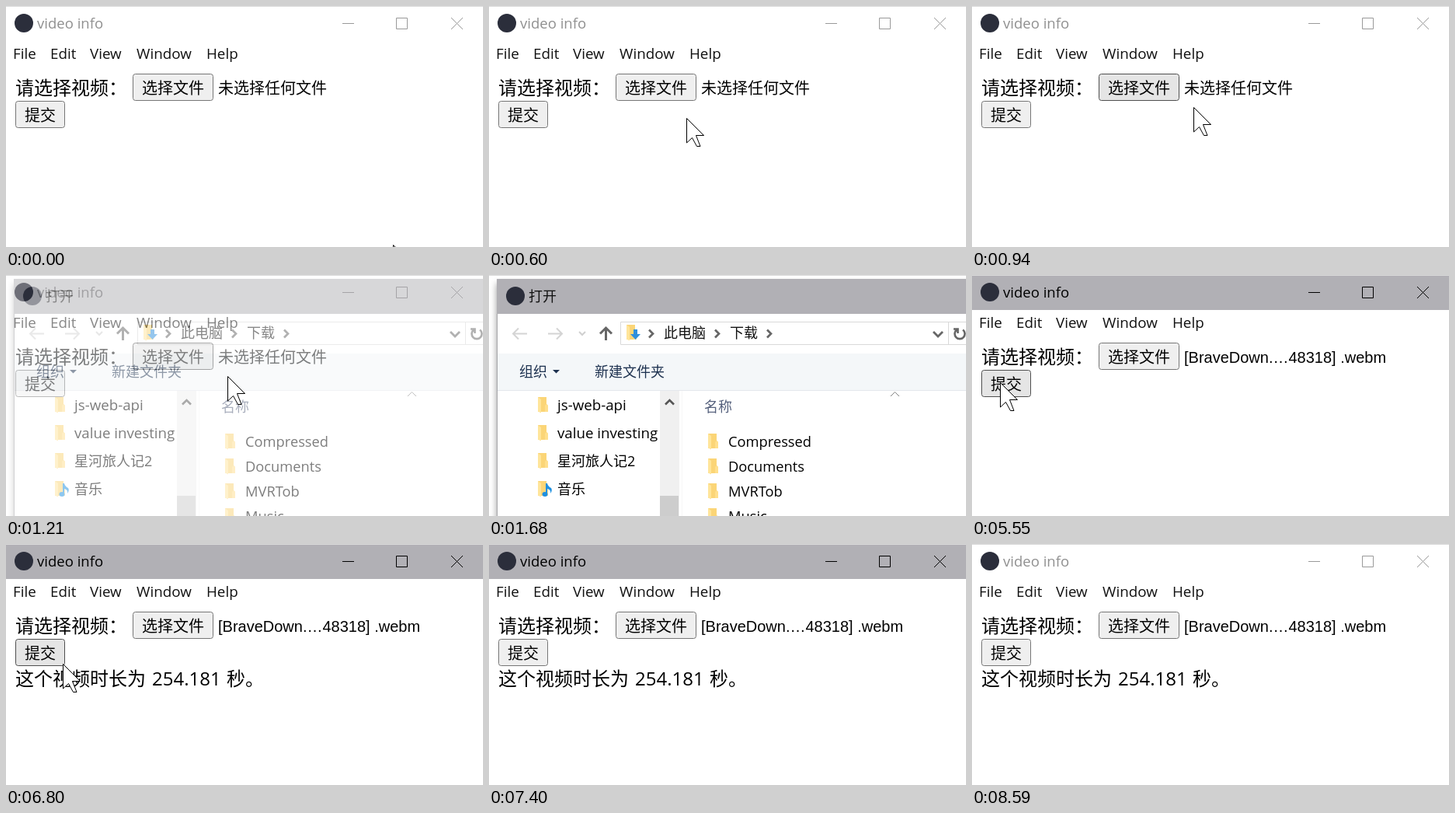
Recreate the animation shown at these times as an HTML page. Size 614x310 px, loop 8.72 s.

```html
<!DOCTYPE html>
<html lang="zh">
<head>
<meta charset="utf-8">
<title>video info</title>
<style>
  html, body { margin: 0; width: 100%; height: 100%; overflow: hidden; background: #fff; }
  svg { display: block; }
  text { font-family: "Open Sans", "Noto Sans CJK SC", "Noto Sans CJK", sans-serif; white-space: pre; }
  .cjk { font-family: "Noto Sans CJK SC", "Noto Sans CJK", sans-serif; }
  .arial { font-family: "Liberation Sans", Arial, sans-serif; }
  .shadow { filter: drop-shadow(0 6px 4px rgba(0, 0, 0, .4)); }
</style>
</head>
<body>
<svg id="stage" width="614" height="310" viewBox="0 0 614 310"></svg>
<script>
const LOOP = 8720;
const BAR = "#b1b0b5";
const stage = document.getElementById("stage");

function add(parent, tag, attrs, content) {
  const el = document.createElementNS("http://www.w3.org/2000/svg", tag);
  for (const key in attrs) el.setAttribute(key, attrs[key]);
  if (content) el.textContent = content;
  parent.appendChild(el);
  return el;
}
const group = (parent, attrs = {}) => add(parent, "g", attrs);
const rect = (parent, x, y, width, height, fill, more = {}) =>
  add(parent, "rect", { x, y, width, height, fill, ...more });
const line = (parent, d, stroke, width = 1) =>
  add(parent, "path", { d, stroke, "stroke-width": width, fill: "none" });
const shape = (parent, d, fill) => add(parent, "path", { d, fill });
const label = (parent, x, y, size, content, fill = "#000", cls = "") =>
  add(parent, "text", { x, y, "font-size": size, fill, class: cls }, content);
const show = (el, on) => el.setAttribute("visibility", on ? "visible" : "hidden");

// Main window
const win = group(stage);
rect(win, 0, 0, 614, 310, "#fff");
const bar = rect(win, 0, 1, 614, 44, "#fff");
rect(win, 0, 0, 614, 1, "#dadada");
add(win, "circle", { cx: 23, cy: 22, r: 12, fill: "#2b2e3b" });
const title = label(win, 40, 29, 18.5, "video info");
const controls = line(win, "M433 22.5H448M502.5 15.5H516.5V29.5H502.5ZM573 15L588 30M588 15L573 30");
[["File", 9], ["Edit", 57], ["View", 108], ["Window", 168], ["Help", 258]]
  .forEach(([name, x]) => label(win, x, 68, 18.8, name, "#111"));

function button(x, y, w, content) {
  const box = rect(win, x + .5, y + .5, w - 1, 34, "#efefef", { rx: 3 });
  label(win, x + 12, y + 26, 20, content, "#000", "cjk");
  return { box, x, y, w };
}
function paintButton(btn, dark) {
  btn.box.setAttribute("fill", dark ? "#e5e5e5" : "#efefef");
  btn.box.setAttribute("stroke", dark ? "#4f4f4f" : "#767676");
}
label(win, 12, 114, 24, "请选择视频：", "#000", "cjk");
const choose = button(163, 87, 104, "选择文件");
const submit = button(12, 122, 64, "提交");
const noFile = label(win, 273, 113, 20, "未选择任何文件", "#000", "cjk");
const fileName = label(win, 273, 113, 20, "[BraveDown.…48318] .webm", "#000", "arial");
const result = group(win);
label(result, 12, 182, 24, "这个视频时长为", "#000", "cjk");
label(result, 188, 182, 24, "254.181");
label(result, 284, 182, 24, "秒。", "#000", "cjk");

// File dialog
const dialog = group(stage);
rect(dialog, 10, 5, 640, 340, "#fff", { class: "shadow" });
rect(dialog, 10, 5, 604, 45, BAR);
rect(dialog, 10, 50, 1, 260, "#a5a5a8");
add(dialog, "circle", { cx: 34, cy: 27, r: 12, fill: "#2b2e3b" });
label(dialog, 51, 34, 18, "打开", "#111", "cjk");

line(dialog, "M49 75.5H31M38 68.5L31 75.5L38 82.5M76 75.5H94M87 68.5L94 75.5L87 82.5", "#d4d4d4", 2);
line(dialog, "M116 73L120 77L124 73", "#d0d0d0", 2);
line(dialog, "M150.5 84V68M143 75.5L150.5 68L158 75.5", "#666", 3);
line(dialog, "M614 60.5H169.5V89.5H614M591.5 60V90", "#d9d9d9");
for (const x of [206, 291, 358]) line(dialog, `M${x} 70.5L${x + 5} 75.5L${x} 80.5`, "#666", 2.7);
label(dialog, 225, 81, 18, "此电脑", "#111", "cjk");
label(dialog, 310, 81, 18, "下载", "#111", "cjk");
line(dialog, "M572 73L578 79L584 73", "#666", 2.8);
line(dialog, "M602 70.5A6.5 6.5 0 1 0 610 70.5M598 69.5H603.5V75", "#666", 2.6);

rect(dialog, 11, 101, 603, 48, "#f4f7f9");
rect(dialog, 11, 148, 603, 1, "#e4e7ec");
label(dialog, 39, 131, 18, "组织", "#1e3250", "cjk");
shape(dialog, "M82 122H91L86.5 126.5Z", "#1e3250");
label(dialog, 136, 131, 18, "新建文件夹", "#1e3250", "cjk");

function folder(x, y) {
  const g = group(dialog, { transform: `translate(${x} ${y})` });
  shape(g, "M1 0H12V9L14 11V19H1Z", "#fbd577");
  shape(g, "M1 0L5 3V20.5L1 18.5Z", "#ffe59a");
  shape(g, "M10 11L12 9L14 11V19H10Z", "#ffdf8c");
  return g;
}
const download = folder(176, 64);
shape(download, "M10 6H15V12H19L12.5 19L6 12H10Z", "#2e8fdc");

["js-web-api", "value investing", "星河旅人记2", "音乐"].forEach((name, i) => {
  const y = 167 + i * 36;
  const icon = folder(62, y - 10);
  if (i === 3) {
    shape(icon, "M11 3H13Q14 7 18 9Q20 12 17 16Q18 11 13 10V17H11Z", "#1e90e0");
    add(icon, "ellipse", { cx: 10, cy: 17, rx: 3.5, ry: 3, fill: "#1e90e0" });
  }
  label(dialog, 88, y + 7, i < 2 ? 18.7 : 18, name);
});
rect(dialog, 220, 149, 25, 161, "#f0f0f0");
rect(dialog, 220, 284, 24, 26, "#cdcdcd");
line(dialog, "M227 166.5L232.5 161L238 166.5", "#555", 2.6);
rect(dialog, 248, 149, 1, 161, "#f7f7f7");

label(dialog, 277, 176, 18, "名称", "#55607c", "cjk");
line(dialog, "M517 156L522.5 150.5L528 156", "#808080");
["Compressed", "Documents", "MVRTob", "Music"].forEach((name, i) => {
  const y = 214 + i * 32;
  folder(281, y - 10);
  label(dialog, 308, y + 7, 18.3, name);
});

// Pointer
const cursor = add(stage, "path", {
  d: "M.5 .5V32L7.5 25.5L13.5 36.5H18L12.5 22.5H22.5Z",
  fill: "#fff", stroke: "#000"
});

// First and last change, steps, then start, bend and end of the path
const moves = [
  [70, 670, 10, [498, 307], [330, 220], [200, 96]],
  [810, 940, 3, [200, 96], [245, 110], [285, 130]],
  [1610, 1680, 2, [285, 130], [590, 212], [895, 294]],
  [4330, 4600, 5, [240, 206], [246, 180], [249, 156]],
  [4950, 5210, 5, [249, 156], [110, 140], [0, 109]],
  [5420, 5550, 3, [0, 109], [18, 122], [36, 138]],
  [6800, 7400, 10, [36, 138], [220, 215], [376, 326]]
];

function stepOf(t, start, end, n) {
  if (t < start) return 0;
  return Math.min(n, Math.floor((t - start) / (end - start) * (n - 1) + 1e-6) + 1) / n;
}
function pointer(t) {
  const [start, end, n, a, b, c] = moves.filter(m => t >= m[0]).pop() || moves[0];
  const p = stepOf(t, start, end, n), q = 1 - p;
  return a.map((v, i) => Math.round(q * q * v + 2 * q * p * b[i] + p * p * c[i]));
}

function draw(t) {
  const [x, y] = pointer(t);
  const visible = t < 1680 || (t >= 4330 && t < 7400);
  const over = btn => visible && x >= btn.x && x <= btn.x + btn.w && y >= btn.y && y <= btn.y + 35;
  const active = t >= 4070 && t < 8590;

  bar.setAttribute("fill", active ? BAR : "#fff");
  title.setAttribute("fill", active ? "#000" : "#909090");
  controls.setAttribute("stroke", active ? "#000" : "#999");
  paintButton(choose, over(choose) || (t >= 670 && t < 4330));
  paintButton(submit, over(submit));
  show(noFile, t < 4130);
  show(fileName, t >= 4130);
  show(result, t >= 6800);

  show(dialog, t >= 1140 && t < 4070);
  dialog.setAttribute("opacity", Math.sqrt(stepOf(t, 1140, 1410, 4)));
  show(cursor, visible);
  cursor.setAttribute("transform", `translate(${x} ${y})`);
}

const origin = performance.now();
function tick() {
  draw((performance.now() - origin) % LOOP);
  requestAnimationFrame(tick);
}
tick();
</script>
</body>
</html>
```
